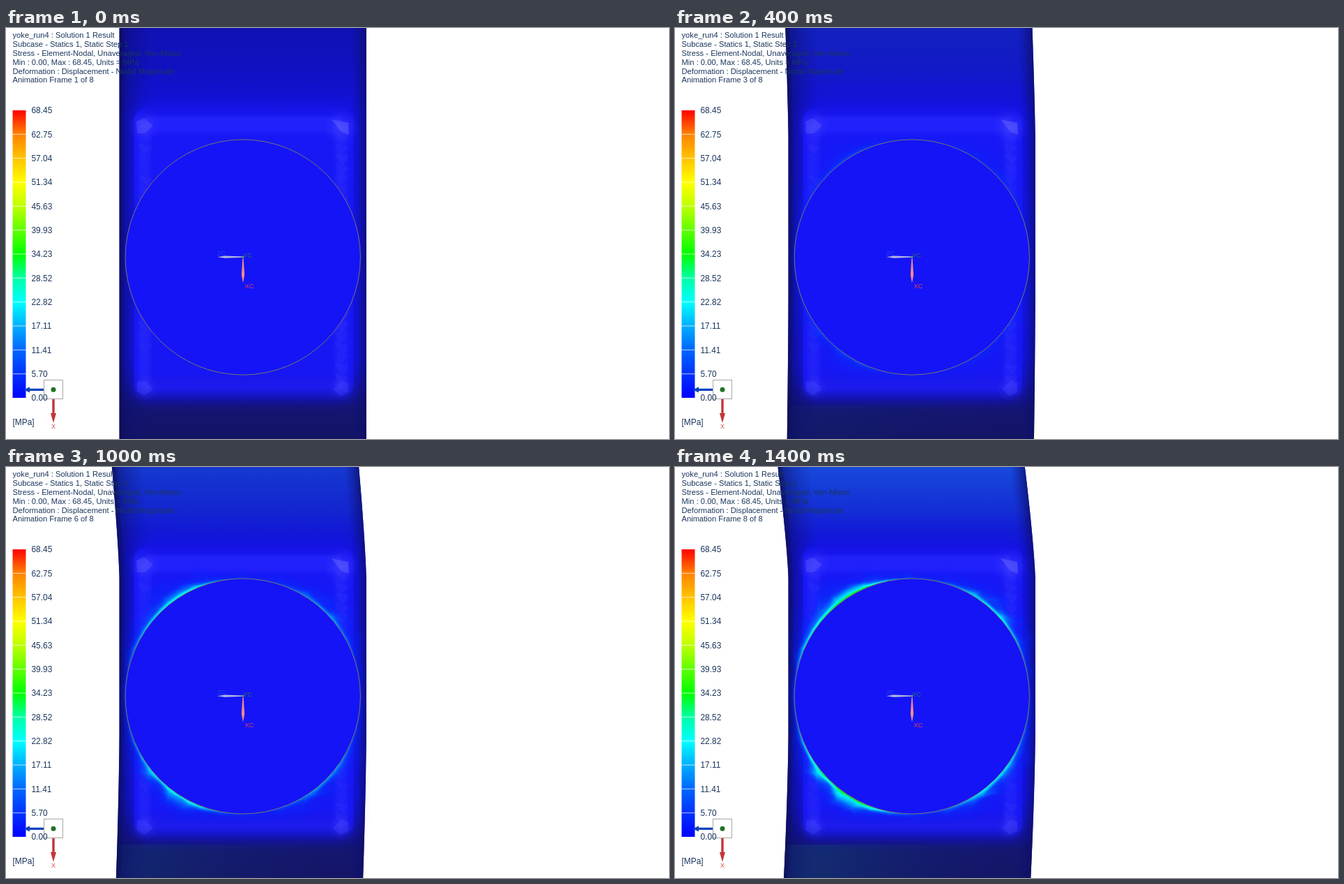
Write an HTML page with a canvas that moves like this. It is 951 px wide and 589 px high and loops after 1600 ms.

```html
<!DOCTYPE html>
<html lang="en">
<head>
<meta charset="utf-8">
<title>Stress result</title>
<style>
  html, body { margin: 0; width: 100%; height: 100%; overflow: hidden; background: #fff; }
  canvas, svg { position: absolute; left: 0; top: 0; display: block; }
  text { font-family: "Liberation Sans", Arial, sans-serif; fill: #1b365d; white-space: pre; }
  #head text { font-size: 11.2px; }
  #scale text { font-size: 11.9px; }
  .axis text { font-size: 9.5px; }
</style>
</head>
<body>
<canvas id="model" width="951" height="589"></canvas>
<svg width="951" height="589" viewBox="0 0 951 589">
  <defs><linearGradient id="ramp" x1="0" y1="1" x2="0" y2="0"></linearGradient></defs>

  <circle cx="339.8" cy="328.5" r="168.6" fill="none" stroke="#77756f" stroke-width="1"/>

  <g class="axis">
    <path d="M340 327.6L314 326.4L303 328.2L314 329.8L340 328.8Z" fill="#b4b8e0"/>
    <path d="M339.4 330L337.8 354L340 365.5L342.2 354L340.6 330Z" fill="#f08a86"/>
    <circle cx="340" cy="328" r="1.6" fill="#48a070"/>
    <text x="302.5" y="326" style="fill:#2440f0">ZC</text>
    <text x="340" y="329" style="fill:#2e6a62">YC</text>
    <text x="342.5" y="373" style="fill:#e0405c">XC</text>
  </g>

  <g id="head">
    <text x="9.5" y="13.6">yoke_run4 : Solution 1 Result</text>
    <text x="9.5" y="26.5">Subcase - Statics 1, Static Step 1</text>
    <text x="9.5" y="39.5">Stress - Element-Nodal, Unaveraged, Von-Mises</text>
    <text x="9.5" y="52.5">Min : 0.00, Max : 68.45, Units = MPa</text>
    <text x="9.5" y="65.5">Deformation : Displacement - Nodal Magnitude</text>
    <text x="9.5" y="78.4" id="count">Animation Frame 1 of 8</text>
  </g>

  <rect x="9.5" y="118" width="19" height="412" fill="url(#ramp)"/>
  <rect x="54.5" y="504.5" width="27" height="27" fill="#fff" stroke="#a8a8a8"/>
  <g id="scale"><text x="9.5" y="568.5">[MPa]</text></g>

  <g class="axis">
    <path d="M54 516.7H34V514.2L25.5 518.4L34 522.6V520H54Z" fill="#0f43bd"/>
    <path d="M66.3 532H69.7V552H72L68 566L64 552H66.3Z" fill="#c23639"/>
    <circle cx="68" cy="518.2" r="3.5" fill="#1f7326"/>
    <text x="65" y="574" style="font-size:9px;fill:#d04a4a">X</text>
  </g>
</svg>
<script>
const STEPS = 8, HOLD = 200, MAX = 68.45;
const CX = 339.8, CY = 328.5, RAD = 168.6;
const c = document.getElementById('model').getContext('2d');
const count = document.getElementById('count');
const rgb = (col, a = 1) => `rgba(${col},${a})`;

// Rainbow scale from zero to MAX, one colour per legend tick
const ramp = ['0,0,255', '0,50,255', '0,102,255', '0,175,255', '0,255,255', '0,255,165', '0,255,0',
  '95,255,0', '190,255,0', '255,255,0', '255,195,0', '255,130,0', '255,0,0'];

function buildLegend() {
  let stops = '', marks = '';
  ramp.forEach((col, i) => {
    const y = 530 - i * 412 / 12;
    stops += `<stop offset="${i / 12}" stop-color="rgb(${col})"/>`;
    if (i % 12) marks += `<path d="M9.5 ${y}h19" stroke="#fff" stroke-opacity=".7"/>`;
    marks += `<text x="36.5" y="${y + 4.2}">${(MAX * i / 12).toFixed(2)}</text>`;
  });
  document.getElementById('ramp').innerHTML = stops;
  document.getElementById('scale').innerHTML += marks;
}

function random(seed) {
  return () => (seed = (seed * 16807) % 2147483647) / 2147483647;
}

// Rings of mesh nodes around the bore: position and stress at full load
const SPOKES = 58;
const offsets = [0, 6, 15, 27, 42], falloff = [1, .5, .27, .1, 0];

function buildMesh() {
  const rnd = random(4127);
  const bump = (a, at, w) => Math.exp(-(((a - at) / w) ** 2));
  return offsets.map((off, r) => Array.from({ length: SPOKES }, (_, i) => {
    const shift = r ? rnd() - .5 : 0;
    const a = (i + r % 2 / 2 + shift * .6) / SPOKES * 2 * Math.PI;
    const diag = Math.sin(2 * a) ** 2, deg = a * 180 / Math.PI;
    const reach = .28 + .6 * diag + .15 * Math.sin(a) ** 2;
    const side = Math.cos(a) < 0 ? 1 : .8;
    const load = (11 + 20 * diag) * side + 13 * bump(deg, 114, 14) + 13 * bump(deg, 246, 16);
    const d = RAD + off * reach * (1 + shift * .5);
    return { x: CX + d * Math.cos(a), y: CY + d * Math.sin(a),
      v: load * falloff[r] * (r ? .65 + .7 * rnd() : 1) };
  }));
}

function buildTriangles(mesh) {
  const out = [];
  for (let r = 0; r < mesh.length - 1; r++) {
    for (let i = 0; i < SPOKES; i++) {
      const j = (i + 1) % SPOKES, a = mesh[r], b = mesh[r + 1];
      if (r % 2) out.push([a[i], a[j], b[j]], [a[i], b[i], b[j]]);
      else out.push([a[i], a[j], b[i]], [a[j], b[i], b[j]]);
    }
  }
  return out;
}

// A linear field over a triangle is a linear gradient of the scale
function shade([p, q, s], u) {
  const ax = q.x - p.x, ay = q.y - p.y, bx = s.x - p.x, by = s.y - p.y;
  const det = ax * by - ay * bx, dq = (q.v - p.v) * u, ds = (s.v - p.v) * u;
  const gx = (dq * by - ds * ay) / det, gy = (ds * ax - dq * bx) / det;
  const g2 = gx * gx + gy * gy;
  if (!(g2 > 1e-8)) return;
  const lo = -p.v * u / g2, hi = (MAX - p.v * u) / g2;
  const grad = c.createLinearGradient(p.x + gx * lo, p.y + gy * lo, p.x + gx * hi, p.y + gy * hi);
  ramp.forEach((col, i) => grad.addColorStop(i / 12, rgb(i ? col : '0,30,255', Math.min(.95, i * .36))));
  const mx = (p.x + q.x + s.x) / 3, my = (p.y + q.y + s.y) / 3;
  c.fillStyle = grad;
  c.beginPath();
  for (const n of [p, q, s]) {
    const dx = n.x - mx, dy = n.y - my, k = 1 + .4 / Math.hypot(dx, dy);
    c.lineTo(mx + dx * k, my + dy * k);
  }
  c.fill();
}

function linear(x0, y0, x1, y1, stops) {
  const g = c.createLinearGradient(x0, y0, x1, y1);
  stops.forEach(([t, col, a]) => g.addColorStop(t, rgb(col, a)));
  return g;
}

// Sideways bend of the bar at height y
function bend(y, u) {
  if (y < 160) return 15 * u * ((160 - y) / 160) ** 1.3;
  return y > 380 ? 6.5 * u * ((y - 380) / 209) ** 1.5 : 0;
}

function drawBar(u) {
  const body = linear(0, 0, 0, 589, [[0, '17,17,180'], [.1, '17,17,194'], [.2, '18,18,220'],
    [.8, '18,18,220'], [.88, '19,19,150'], [.93, '20,20,112'], [1, '20,20,100']]);
  const top = linear(0, 0, 0, 125, [[0, '24,84,226', u * .85], [.5, '22,66,226', u * .6], [1, '20,30,235', 0]]);
  const low = linear(155, 0, 460, 0, [[0, '18,62,118', u * .7], [1, '20,30,110', u * .2]]);
  for (let y = 0; y < 589; y++) {
    const d = bend(y + .5, u), l = 162.6 - d, r = 516.8 - d;
    const edge = linear(l, 0, r, 0, [[0, '12,14,88', .85], [.014, '12,14,92', .75], [.022, '12,14,98', .52],
      [.06, '13,14,110', .3], [.13, '13,14,120', 0], [.94, '13,14,120', 0], [.975, '13,14,110', .4], [1, '12,14,95', .75]]);
    const row = style => { c.fillStyle = style; c.fillRect(l, y, r - l, 1); };
    row(body);
    if (y < 125) row(top);
    if (y > 540) row(low);
    row(edge);
  }
}

function poly(col, a, ...pts) {
  c.fillStyle = rgb(col, a);
  c.beginPath();
  for (let i = 0; i < pts.length; i += 2) c.lineTo(pts[i], pts[i + 1]);
  c.fill();
}

function glow(x, y, r, a) {
  const g = c.createRadialGradient(x, y, 0, x, y, r);
  g.addColorStop(0, rgb('76,76,255', a));
  g.addColorStop(1, rgb('50,50,255', 0));
  c.fillStyle = g;
  c.fillRect(x - r, y - r, 2 * r, 2 * r);
}

function drawPad() {
  c.save();
  c.shadowColor = 'rgb(20,20,236)';
  c.shadowBlur = 20;
  c.fillStyle = linear(0, 110, 0, 535, [[0, '20,20,226'], [.06, '24,24,246'], [.9, '23,23,244'],
    [.96, '22,22,222'], [1, '20,20,165']]);
  c.beginPath();
  c.roundRect(184, 114, 314, 415, 18);
  c.fill();
  c.restore();

  c.fillStyle = linear(0, 124, 0, 155, [[0, '40,40,255', 0], [.2, '40,40,255', .6], [.75, '38,38,255', .55], [1, '30,30,255', 0]]);
  c.fillRect(200, 124, 280, 31);
  c.fillStyle = linear(0, 498, 0, 530, [[0, '34,34,255', 0], [.5, '34,34,252', .45], [1, '30,30,230', 0]]);
  c.fillRect(200, 498, 280, 32);
  for (const x of [187, 469]) {
    c.fillStyle = linear(x, 0, x + 24, 0, [[0, '44,44,255', 0], [.3, '44,44,255', .45], [.8, '40,40,255', .35], [1, '30,30,255', 0]]);
    c.fillRect(x, 140, 24, 375);
  }

  // Faint facets along the fillets
  const rnd = random(91);
  for (let y = 150; y < 505; y += 15) {
    for (const x of [188, 470]) {
      poly('70,70,255', .05 + .13 * rnd(), x + 4 * rnd(), y, x + 22, y + 6 * rnd(), x + 9 + 6 * rnd(), y + 18);
    }
  }
  glow(199, 140, 24, .5);
  glow(481, 142, 26, .6);
  glow(199, 516, 20, .35);
  glow(481, 516, 20, .35);
  poly('92,92,255', .4, 187, 134, 198, 129, 211, 140, 199, 151, 188, 151);
  poly('104,104,255', .45, 467, 131, 491, 136, 492, 153, 481, 149);
  poly('70,70,255', .35, 188, 507, 199, 505, 211, 518, 198, 527, 188, 520);
  poly('70,70,255', .35, 469, 518, 482, 505, 491, 508, 491, 522, 480, 527);
}

const triangles = buildTriangles(buildMesh());

function draw(step) {
  const u = step / (STEPS - 1);
  c.clearRect(0, 0, 951, 589);
  drawBar(u);
  drawPad();
  if (u) {
    c.save();
    c.beginPath();
    c.rect(162.6, 100, 354.2, 440);
    c.clip();
    triangles.forEach(t => shade(t, u));
    c.restore();
  }
  c.fillStyle = 'rgb(20,20,247)';
  c.beginPath();
  c.arc(CX, CY, RAD, 0, 2 * Math.PI);
  c.fill();
  count.textContent = `Animation Frame ${step + 1} of ${STEPS}`;
}

buildLegend();
let shown = -1;
const start = performance.now();
function tick() {
  const step = Math.floor((performance.now() - start) / HOLD) % STEPS;
  if (step !== shown) draw(shown = step);
  requestAnimationFrame(tick);
}
tick();
</script>
</body>
</html>
```
